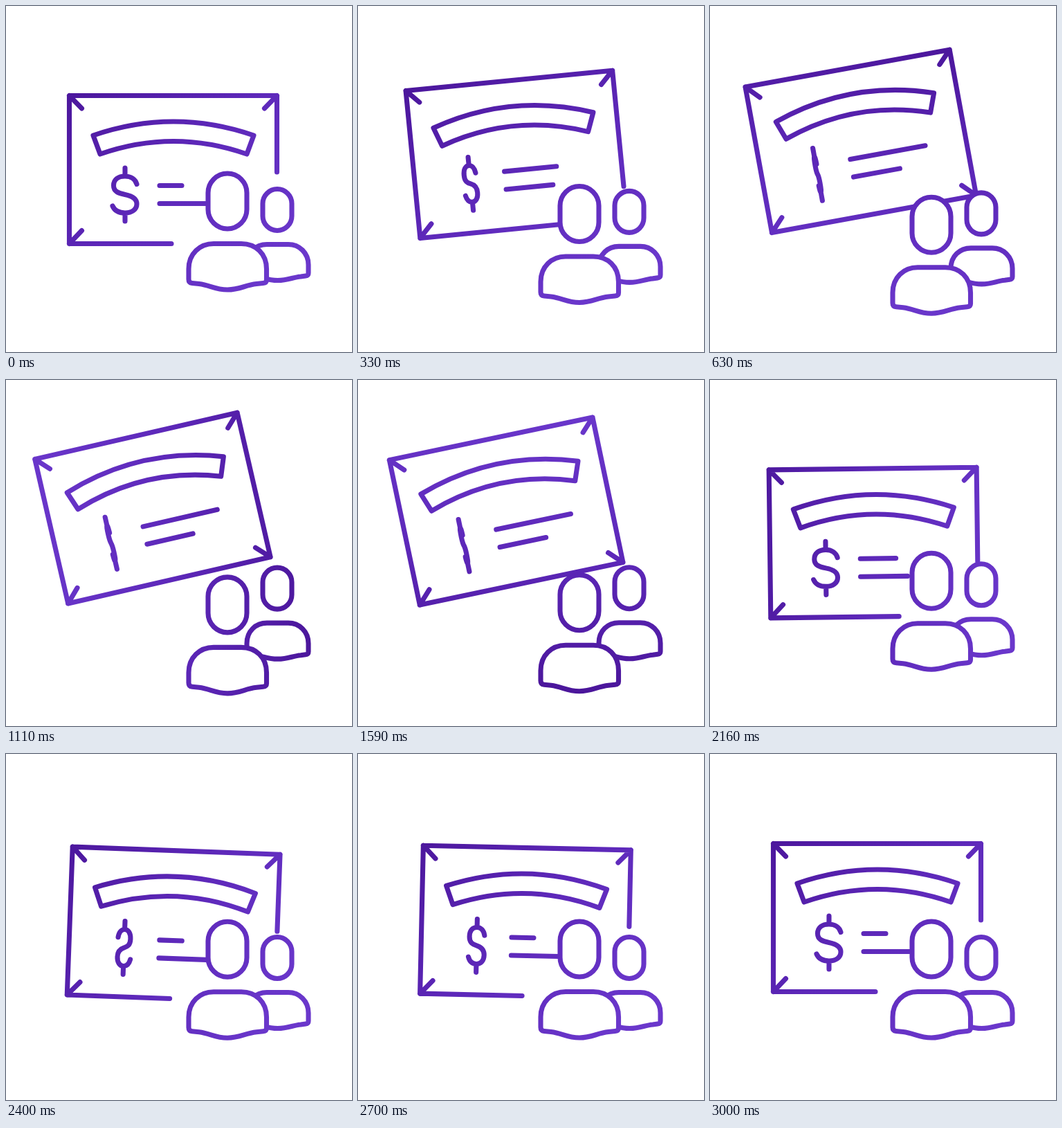
Animation, 500 px wide and 500 px high, one loop 3.53 s. Source, as an HTML page with a canvas:

```html
<!DOCTYPE html>
<html lang="en">
<head>
<meta charset="utf-8">
<title>Price board presentation</title>
<style>
html, body { margin: 0; width: 100%; height: 100%; overflow: hidden; background: #fff; }
canvas { display: block; width: 100vw; height: 100vh; }
</style>
</head>
<body>
<canvas id="stage" width="500" height="500"></canvas>
<script>
const ctx = document.getElementById('stage').getContext('2d');
const LOOP = 3530, END = 3000, STEP = 30;
const CX = 241.75, CY = 236.5; // board centre at rest

const clamp = v => Math.max(0, Math.min(1, v));
const mix = (a, b, k) => a + (b - a) * k;
const smooth = s => s * s * (3 - 2 * s);

// Cubic easing with flat ends: control points (x1, 0) and (x2, 1)
function ease(t, from, to, x1, x2) {
  const x = clamp((t - from) / (to - from));
  let lo = 0, hi = 1;
  for (let i = 0; i < 24; i++) {
    const s = (lo + hi) / 2, r = 1 - s;
    if (3 * s * r * r * x1 + 3 * s * s * r * x2 + s * s * s < x) lo = s; else hi = s;
  }
  return smooth((lo + hi) / 2);
}

const ribbon = new Path2D('M126 187Q242 147 358 187L348 214Q242 177 136 214Z');
const dollar = new Path2D('M172 234V246M172 299V311M189 257.5C187 250 180 246 172 246C162 246 155.500 251 155.500 259.500C155.500 268.500 163 270.500 172 272.500C182 274.500 189 278 189 286C189 294 182 299 172 299C163 299 157 296 154 289');
const frontBody = new Path2D('M264 380C264 358 280 343.500 300 343.500H340C361 343.500 376.500 358 376.500 380V396Q376.500 400 371.500 400.500L362 401.500C345 403.500 338 410 320 410C302 410 295 403.500 279 401.500L269 400.500Q264 400 264 395Z');
const backBody = new Path2D('M348 374C348 356 361 344.500 377 344.500H408C424 344.500 437 357 437 374V386Q437 389.500 433 390L426 391C414 392 408 396.500 392.500 396.500C377 396.500 371 392 359 391L352 390Q348 389.500 348 386Z');

function capsule(x, y, w, h) {
  const p = new Path2D();
  p.roundRect(x, y, w, h, w / 2);
  return p;
}
const frontHead = capsule(292, 242, 56, 80);
const backHead = capsule(371, 264.5, 42, 60);

// Transforms the path itself, so the line weight stays constant
function draw(path, matrix, fill) {
  const p = new Path2D();
  p.addPath(path, matrix);
  if (fill) ctx.fill(p);
  ctx.stroke(p);
}

function boardLines(trim) {
  const L = 91.5, T = 129.5, R = 391.5, B = 343.5;
  const p = new Path2D();
  const line = (x1, y1, x2, y2) => { p.moveTo(x1, y1); p.lineTo(x2, y2); };
  p.moveTo(mix(239, R, trim), B);
  p.lineTo(L, B);
  p.lineTo(L, T);
  p.lineTo(R, T);
  p.lineTo(R, mix(240, B, trim));
  line(L, T, L + 18, T + 18.5);
  line(L, B, L + 18, B - 19);
  line(R, T, R - 18, T + 18.5);
  const k = clamp((trim - 0.8) * 5);
  if (k > 0) line(R, B, R - 18 * k, B - 18 * k);
  line(222, 259.5, mix(254, 332, trim), 259.5);
  line(222, 285.5, 290, 285.5);
  return p;
}

function setPaint(t) {
  const a = (-135 + 360 * smooth(clamp(t / 2700))) * Math.PI / 180;
  const dx = Math.cos(a) * 200, dy = Math.sin(a) * 200;
  const g = ctx.createLinearGradient(240 + dx, 245 + dy, 240 - dx, 245 - dy);
  g.addColorStop(0, '#4b169b');
  g.addColorStop(0.5, '#5d28b9');
  g.addColorStop(1, '#6a37cb');
  ctx.strokeStyle = g;
  ctx.fillStyle = '#fff';
  ctx.lineWidth = 7.1;
  ctx.lineCap = ctx.lineJoin = 'round';
}

function render(t) {
  const out = ease(t, 0, 1200, 0.2, 0.3);
  const back = ease(t, 1200, 2457, 0.75, 0.605);
  const settle = 1 - ease(t, 2457, END, 0.33, 0.67);
  const lift = out * (1 - back);
  const over = back * settle;
  const trim = Math.min(1, 1.3 * lift);
  const spin = 86 * ease(t, 0, 600, 0.3, 0.5) - 446 * ease(t, 1590, END, 0.674, 0.564);

  ctx.clearRect(0, 0, 500, 500);
  setPaint(t);

  const board = new DOMMatrix()
    .translate(CX - 29.7 * lift + 0.8 * over, CY - 51.7 * lift + 10.4 * over)
    .rotate(-13 * lift + 2.2 * over)
    .translate(-CX, -CY);
  draw(boardLines(trim), board);
  draw(ribbon, board);
  const flip = Math.cos(spin * Math.PI / 180);
  draw(dollar, board.translate(171.5, 0).scale(flip, 1).translate(-171.5, 0));

  const far = new DOMMatrix().translate(0, 6.7 * lift);
  const near = new DOMMatrix().translate(0, 43 * lift);
  draw(backBody, far, true);
  draw(backHead, far, true);
  draw(frontBody, near, true);
  draw(frontHead, near, true);
}

const start = performance.now();
function tick() {
  const t = (performance.now() - start) % LOOP;
  render(Math.min(END, Math.floor(t / STEP) * STEP));
  requestAnimationFrame(tick);
}
tick();
</script>
</body>
</html>
```
